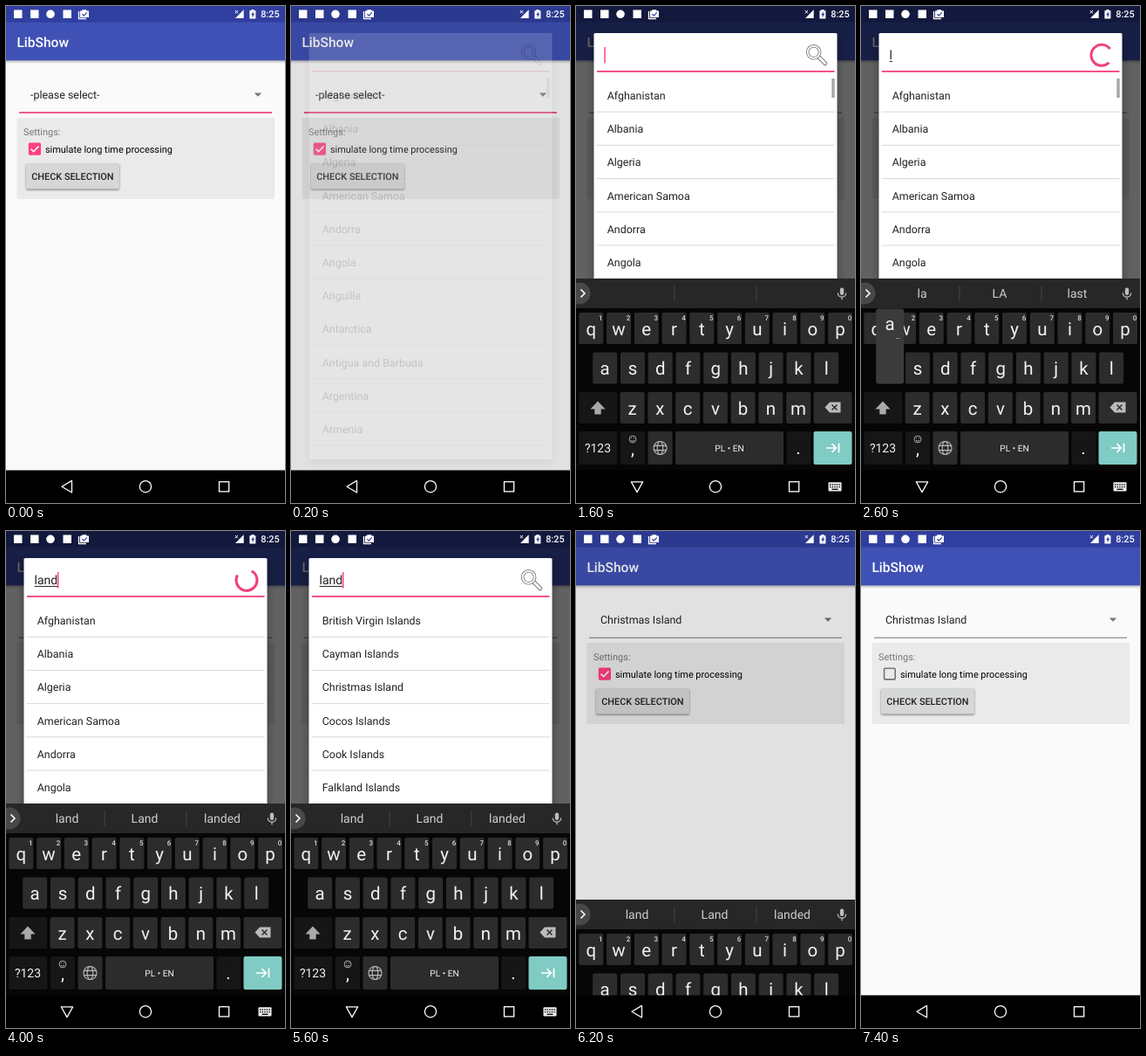
These frames come from a looping animation (320x569 px, 8000 ms). An HTML page:

```html
<!DOCTYPE html>
<html lang="en">
<head>
<meta charset="utf-8">
<title>Searchable spinner</title>
<style>
  html, body { margin: 0; width: 100%; height: 100%; overflow: hidden; background: #000; }
  svg { display: block; width: 100%; height: 100%; }
  text { font-family: Roboto, "Noto Sans", sans-serif; font-size: 12.45px; fill: #212121; text-rendering: geometricPrecision; }
  .small { font-size: 10.9px; }
  .med { font-weight: 500; }
  .mid { text-anchor: middle; }
  .line { fill: none; stroke: #fff; stroke-width: 1.3; }
  #keyboard text { fill: #f2f2f2; }
  #keyboard .word { font-size: 14px; fill: #cfcfcf; }
  #keyboard .letter { font-size: 20.5px; }
  #keyboard .digit { font-size: 8px; font-weight: 500; fill: #d8d8d8; }
  .key { fill: #2c2c2c; }
  .fn { fill: #161616; }
</style>
</head>
<body>
<svg viewBox="0 0 320 569" preserveAspectRatio="none">
  <defs>
    <linearGradient id="fade" x2="0" y2="1">
      <stop offset="0" stop-opacity=".28"/><stop offset="1" stop-opacity="0"/>
    </linearGradient>
    <filter id="soft" x="-20%" y="-20%" width="140%" height="140%"><feGaussianBlur stdDeviation="1"/></filter>
    <filter id="deep" x="-20%" y="-20%" width="140%" height="140%"><feGaussianBlur stdDeviation="5"/></filter>
    <clipPath id="listClip"><rect x="20" y="77" width="280" height="441"/></clipPath>
    <clipPath id="keyClip"><rect y="300" width="320" height="232"/></clipPath>
  </defs>

  <g id="app">
    <rect width="320" height="569" fill="#fafafa"/>
    <rect y="62" width="320" height="4" fill="url(#fade)"/>
    <rect width="320" height="62.3" fill="#3f51b5"/>
    <rect width="320" height="18.7" fill="#303f9f"/>
    <text x="12.4" y="46.6" class="med" style="font-size:15.56px;fill:#fff">LibShow</text>

    <text id="choice" x="28" y="106"></text>
    <path d="M284.8 99.5h8.4l-4.2 4.3z" fill="#757575"/>
    <rect id="under" x="15" width="290"/>

    <rect x="12.5" y="128" width="295.5" height="93" fill="#eaeaea"/>
    <text x="20" y="148" class="small" style="fill:#757575">Settings:</text>
    <circle id="ripple" cx="33" cy="163.5" r="15"/>
    <g id="checked">
      <rect x="25.8" y="156.5" width="14.2" height="14.2" rx="1.6" fill="#ff4081"/>
      <path d="M28.6 163.6l3 3.1 5.9-6.2" fill="none" stroke="#fff" stroke-width="1.6"/>
    </g>
    <rect id="unchecked" x="26.6" y="157.3" width="12.6" height="12.6" rx="1" fill="none" stroke="#757575" stroke-width="1.6"/>
    <text x="45" y="168" class="small" style="fill:#000">simulate long time processing</text>
    <rect x="23" y="181.5" width="107" height="29" rx="1.5" fill="#777" filter="url(#soft)"/>
    <rect x="23" y="180.5" width="107" height="29" rx="1.5" fill="#d6d7d7"/>
    <text x="29.2" y="199" class="small med">CHECK SELECTION</text>
  </g>

  <rect id="dim" width="320" height="532"/>

  <g id="dialog">
    <rect x="20" y="36" width="280" height="487" opacity=".35" filter="url(#deep)"/>
    <rect x="20.5" y="31" width="279" height="488" rx="1.6" fill="#fff"/>
    <text id="query" x="32.6" y="61.3" style="font-size:14px"></text>
    <rect id="queryLine" x="32.6" y="62.9" height="1" fill="#212121"/>
    <rect id="caret" y="47" width="1.5" height="18.5" fill="#ff4081"/>
    <rect x="24" y="74" width="272.5" height="1.8" fill="#f0407c"/>
    <g id="lens" fill="none">
      <path d="M278.8 58.8l7 7" stroke="#777" stroke-width="4.8" stroke-linecap="round"/>
      <path d="M278.8 58.8l7 7" stroke="#fff" stroke-width="2.8" stroke-linecap="round"/>
      <circle cx="272.6" cy="52.8" r="7" stroke="#777" stroke-width="3.6"/>
      <circle cx="272.6" cy="52.8" r="7" stroke="#fff" stroke-width="1.8"/>
    </g>
    <path id="busy" fill="none" stroke="#f0407c" stroke-width="3"/>
    <g id="list" clip-path="url(#listClip)"></g>
    <rect id="bar" x="293.3" y="83" width="3.4" fill="#a6a6a6"/>
  </g>

  <rect id="veil" width="320" height="532"/>

  <g clip-path="url(#keyClip)"><g id="keyboard"></g></g>

  <g id="status" fill="#fff">
    <rect x="9" y="4.5" width="9.5" height="9.5"/>
    <rect x="28" y="4.5" width="9.5" height="9.5"/>
    <circle cx="51" cy="9.3" r="4.8"/>
    <rect x="65.5" y="4.5" width="9.5" height="9.5"/>
    <path d="M83.5 6v8.5h8.5" class="line" stroke-width="1.1"/>
    <path d="M85 5.5h2.3v-1.3h5v1.3h2.7v7.6H85z"/>
    <path d="M87.4 9.2l1.9 1.9 3.5-3.7" fill="none" stroke="#303f9f" stroke-width="1.2"/>
    <path d="M263 14h9.7V4.3z"/>
    <path d="M262.8 5l3.2 3.4m0-3.4l-3.2 3.4" class="line" style="stroke-width:1"/>
    <path d="M281.4 4h3v1.2h2V14.5h-7V5.2h2z"/>
    <path d="M283.7 6.3l-2.6 4h1.5v3l2.5-4.2h-1.4z" fill="#303f9f"/>
    <text x="292.3" y="13.3" class="small med" style="fill:#fff">8:25</text>
  </g>

  <rect y="531.5" width="320" height="38"/>
  <path id="back" class="line" stroke-linejoin="round"/>
  <circle class="line" cx="160" cy="550.2" r="6.6"/>
  <rect class="line" x="244.5" y="544.7" width="11.2" height="11.2"/>
  <g id="imeIcon">
    <rect x="289.5" y="545.2" width="15" height="10.2" rx="1" fill="#eee"/>
    <path d="M291 548h12m-12 2.6h12" stroke="#000" stroke-width="1.4" stroke-dasharray="1.4 1.2"/>
    <path d="M293.5 553.3h7" stroke="#000" stroke-width="1.3"/>
  </g>
</svg>

<script>
const $ = id => document.getElementById(id);
const set = (id, attrs) => { for (const k in attrs) $(id).setAttribute(k, attrs[k]); };
const show = (id, on) => { $(id).style.display = on ? '' : 'none'; };
const label = (x, y, cls, s) => `<text x="${x}" y="${y}" class="${cls}">${s}</text>`;
const box = (x, y, w, h, cls) => `<rect x="${x}" y="${y}" width="${w}" height="${h}" rx="2" class="${cls}"/>`;

const LOOP = 8000, TICK = 200;
const ALL = ['Afghanistan', 'Albania', 'Algeria', 'American Samoa', 'Andorra', 'Angola',
  'Anguilla', 'Antarctica', 'Antigua and Barbuda', 'Argentina', 'Armenia'];
const FOUND = ['British Virgin Islands', 'Cayman Islands', 'Christmas Island',
  'Cocos Islands', 'Cook Islands', 'Falkland Islands'];

// Stepped tracks: [time, value]; the last entry at or before t holds.
const tracks = {
  dim: [[0, 0], [200, .1], [400, .4], [600, .61], [6000, 0]],
  dialog: [[0, 0], [200, .15], [400, .6], [600, 1], [6000, .58], [6200, 0]],
  veil: [[0, 0], [6000, .38], [6200, .1], [6400, 0]],
  slide: [[0, 1], [1400, .5], [1600, 0], [6200, .5], [6400, 1]],
  ime: [[0, 0], [800, 1], [6000, 0]],
  query: [[0, ''], [2200, 'l'], [2800, 'la'], [3400, 'lan'], [3800, 'land']],
  words: [[0, ''], [2200, 'la LA last'], [2800, 'la LA last'], [3400, 'lan LAN land'], [3800, 'land Land landed']],
  press: [[0, ''], [2000, 'l'], [2200, ''], [2600, 'a'], [2800, ''], [3200, 'n'], [3400, ''], [3600, 'd'], [3800, '']],
  caret: [[0, 0], [1000, 1], [1400, 0], [1600, 1], [2400, 0], [2800, 1], [4400, 0], [4600, 1], [5000, 0], [5600, 1]],
  busy: [[0, 0], [2200, 1], [4400, 0]],
  bar: [[0, 22], [3200, 0], [6000, 207]],
  ripple: [[0, 0], [7000, .14], [7200, .07], [7400, 0]]
};
const at = (name, t) => tracks[name].filter(e => e[0] <= t).pop()[1];

const spots = {};
function buildKeyboard() {
  let s = '<rect y="312" width="320" height="222" fill="#060606"/><rect y="312" width="320" height="34" fill="#272727"/>';
  s += '<circle cx="4" cy="329" r="12.5" fill="#484848"/><path d="M5.5 324.5l4.5 4.5-4.5 4.5" class="line" style="stroke-width:1.6"/>';
  s += '<path d="M113 320v18M207 320v18" stroke="#444"/><g id="words"></g>';
  s += '<rect x="302.8" y="322.5" width="4.4" height="8.5" rx="2.2" fill="#bbb"/><path d="M300.3 328.5a4.7 4.7 0 0 0 9.4 0M305 333.2v3" class="line" style="stroke:#bbb"/>';
  [['qwertyuiop', 17.3, 351], ['asdfghjkl', 33.2, 396.5], ['zxcvbnm', 64.6, 442]].forEach(([row, x0, y], r) => {
    [...row].forEach((c, i) => {
      const x = x0 + 31.75 * i;
      spots[c] = [x, y];
      s += box(x - 14, y, 28, 36, 'key') + label(x, y + 25.5, 'letter mid', c);
      if (!r) s += label(x + 11, y + 9, 'digit mid', (i + 1) % 10);
    });
  });
  s += box(3.3, 442, 44, 36, 'fn') + box(272.5, 442, 44, 36, 'key');
  s += '<path d="M25 452.5l8.5 9h-4.8v6h-7.4v-6h-4.8z" fill="#aaa"/>';
  s += '<path d="M291 453.5h12.5v12H291l-5.5-6z" fill="#bbb"/><path d="M293.5 456.5l6 6m0-6l-6 6" stroke="#2c2c2c" stroke-width="1.5"/>';
  s += box(3.3, 487, 44, 38, 'fn') + box(51, 487, 28, 38, 'fn') + box(82.5, 487, 28, 38, 'key');
  s += box(114, 487, 124, 38, 'key') + box(241.5, 487, 28, 38, 'fn');
  s += '<rect x="272.5" y="487" width="44" height="38" rx="2" fill="#80cbc4"/>';
  s += '<path d="M287 506h11m-4.5-4.8l4.8 4.8-4.8 4.8M301.5 500.8v10.4" class="line" style="stroke-width:1.7"/>';
  s += `<text x="25" y="511" class="mid" style="font-size:14px">?123</text>`;
  s += `<text x="176" y="510" class="mid" style="font-size:10.2px">PL • EN</text>`;
  s += label(65, 514, 'letter mid', ',') + label(255, 513, 'letter mid', '.');
  s += '<g class="line" style="stroke:#bbb;stroke-width:.9"><circle cx="65" cy="496" r="3.9"/><path d="M63 497.2q2 2 4 0M63.5 494.2v.9m3-.9v.9"/></g>';
  s += '<g class="line" style="stroke:#bbb;stroke-width:1.1"><circle cx="96.5" cy="506" r="7.5"/><ellipse cx="96.5" cy="506" rx="3.3" ry="7.5"/><path d="M89.6 503.4h13.8m-13.8 5.2h13.8"/></g>';
  $('keyboard').innerHTML = s + '<g id="popup"></g>';
}

function popup(c) {
  if (!c) return '';
  const [x, y] = spots[c];
  return `<rect x="${x - 16}" y="${y - 50}" width="32" height="86" rx="3" fill="#3b3b3b"/>` +
    label(x, y - 25.5, 'letter mid', c) + label(x + 9, y - 16, 'digit mid', '…');
}

const rows = names => ALL.map((_, i) => {
  const y = 107 + 38.2 * i;
  return label(35.7, y, '', names[i] || '') +
    `<rect x="23.5" y="${y + 13.7}" width="273" height="1" fill="#d9d9d9"/>`;
}).join('');

const ease = p => p * p * (3 - 2 * p);
function arc(t) {
  const c = (t - 2600) / 1333 + .5, p = c - Math.floor(c);
  const head = 270 * ease(Math.min(1, 2 * p)), tail = 270 * ease(Math.max(0, 2 * p - 1));
  const from = tail + 234 * c - 72, sweep = head - tail + 8;
  const pt = a => `${276 + 12 * Math.cos(a * Math.PI / 180)} ${56.3 + 12 * Math.sin(a * Math.PI / 180)}`;
  return `M${pt(from)}A12 12 0 ${sweep > 180 ? 1 : 0} 1 ${pt(from + sweep)}`;
}

function draw(t) {
  const picked = t >= 6000, fresh = t < 400, ticked = t < 7200;
  $('choice').textContent = picked ? 'Christmas Island' : '-please select-';
  set('under', fresh ? { y: 121.2, height: 1.7, fill: '#f0407c' } : { y: 121.7, height: 1, fill: '#757575' });
  show('checked', ticked);
  show('unchecked', !ticked);
  for (const id of ['dim', 'dialog', 'veil', 'ripple']) set(id, { opacity: at(id, t) });

  const text = at('query', t);
  $('query').textContent = text;
  const w = text ? $('query').getComputedTextLength() : 0;
  set('queryLine', { width: w });
  set('caret', { x: 32.3 + w });
  show('caret', at('caret', t));
  show('lens', !at('busy', t));
  show('busy', at('busy', t));
  set('busy', { d: arc(t) });
  set('bar', { height: at('bar', t) });
  $('list').innerHTML = rows(t < 4400 ? ALL : FOUND);

  const slide = at('slide', t);
  show('keyboard', slide < 1);
  set('keyboard', { transform: `translate(0 ${220 * slide})` });
  $('words').innerHTML = at('words', t).split(' ').map((s, i) => label(70 + 89 * i, 334.3, 'word mid', s)).join('');
  $('popup').innerHTML = popup(at('press', t));

  const ime = at('ime', t);
  show('imeIcon', ime);
  set('back', { d: ime ? 'M63.3 544.8h13.4L70 556.6z' : 'M75.5 543.4v13.6L64 550.2z' });
}

buildKeyboard();
let start, last = -1;
function frame(now) {
  start ??= now;
  const t = Math.floor((now - start) % LOOP / TICK) * TICK;
  if (t !== last) draw(last = t);
  requestAnimationFrame(frame);
}
draw(0);
requestAnimationFrame(frame);
</script>
</body>
</html>
```
